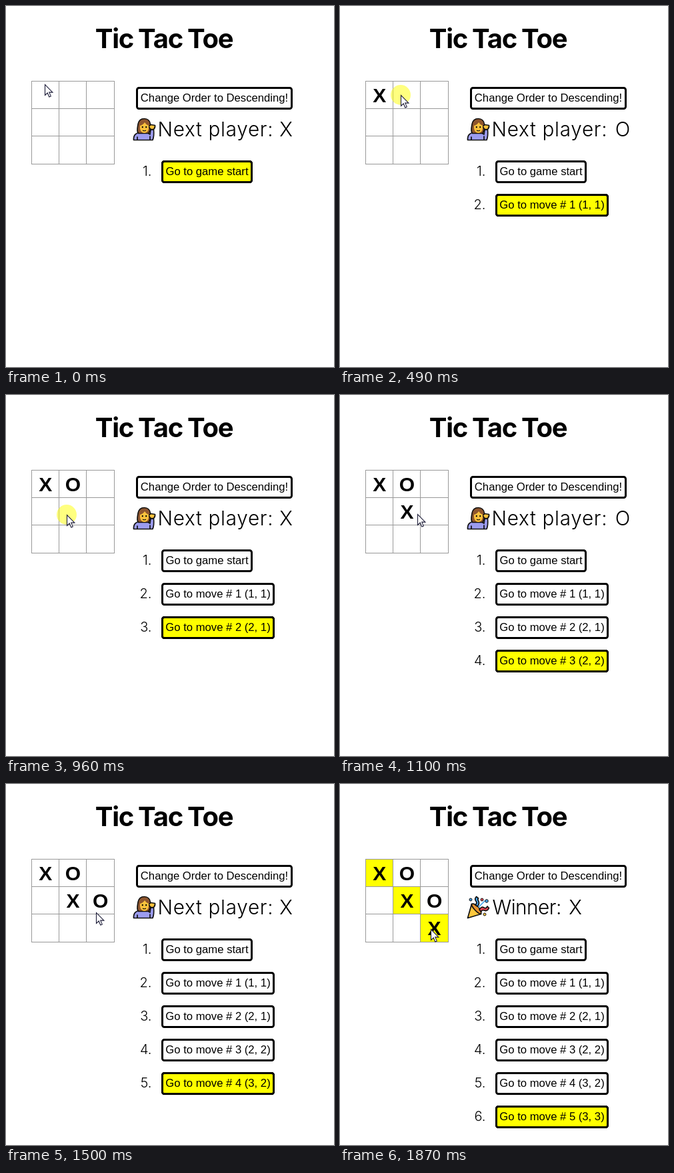
An HTML page that plays this animation: 492x540 px, repeating every 2190 ms.

```html
<!DOCTYPE html>
<html lang="en">
<head>
<meta charset="utf-8">
<title>Tic Tac Toe</title>
<style>
@property --n { syntax: "<integer>"; inherits: true; initial-value: 0; }
html, body { margin: 0; width: 100%; height: 100%; overflow: hidden; background: #fff; }
svg { display: block; width: 492px; height: 540px; animation: moves 2190ms step-end infinite; }

/* --n counts the moves made; --i is the move an element belongs to */
.from { opacity: calc(var(--n) - var(--i) + 1); }
.now { opacity: min(var(--n) - var(--i) + 1, var(--i) + 1 - var(--n)); }
.playing { opacity: calc(5 - var(--n)); }

text { fill: #000; }
.title, .status, .num { font-family: Inter, "Open Sans", sans-serif; }
.title { font-size: 40px; font-weight: 700; letter-spacing: -1.2px; word-spacing: -1.3px; text-anchor: middle; }
.status { font-size: 29.7px; font-weight: 300; }
.num { font-size: 20px; font-weight: 300; text-anchor: end; }
.label { font: 16.667px "Liberation Sans", Arial, sans-serif; text-anchor: middle; }
.mark { font: 700 30px "Liberation Sans", Arial, sans-serif; text-anchor: middle; }
.box { fill: #fff; stroke: #000; stroke-width: 3; }
.lit { fill: #ff0; }
.grid { fill: none; stroke: #999; }
.icon { stroke: #111; stroke-width: 1.7; stroke-linejoin: round; stroke-linecap: round; }
.pointer { animation: travel 2190ms step-end infinite; }
.ring { fill: #ff0; fill-opacity: .5; animation: click 2190ms step-end infinite; }

@keyframes moves {
  0% { --n: 0; }
  7.76% { --n: 1; }
  28.76% { --n: 2; }
  47.48% { --n: 3; }
  68.49% { --n: 4; }
  85.38%, 100% { --n: 5; }
}
@keyframes travel {
  0% { transform: translate(58px, 117px); }
  11.41% { transform: translate(64px, 119px); }
  15.06% { transform: translate(77px, 125px); }
  18.72% { transform: translate(88px, 131px); }
  22.37% { transform: translate(91px, 133px); }
  28.76% { transform: translate(88px, 157px); }
  32.87% { transform: translate(89px, 166px); }
  36.52% { transform: translate(91px, 174px); }
  40.18% { transform: translate(91px, 179px); }
  47.48% { transform: translate(92px, 179px); }
  50.22% { transform: translate(116px, 178px); }
  54.33% { transform: translate(126px, 177px); }
  57.53% { transform: translate(134px, 177px); }
  68.49% { transform: translate(135px, 192px); }
  71.23% { transform: translate(135px, 206px); }
  74.88%, 100% { transform: translate(136px, 217px); }
}
@keyframes click {
  0%, 7.76%, 28.76%, 47.48%, 68.49%, 85.38%, 100% { opacity: 0; }
  4.1%, 22.37%, 43.83%, 60.73%, 81.73% { opacity: 1; }
}
</style>
</head>
<body>
<svg viewBox="0 0 492 540">
  <text class="title" x="237" y="63">Tic Tac Toe</text>

  <g class="from lit" style="--i:5">
    <path d="M38 112h41v41h-41zM79 153h41v41h-41zM120 194h42v42h-42z"/>
  </g>
  <path class="grid" d="M38 112.5h125M38 153.5h125M38 194.5h125M38 236.5h125M38.5 112v125M79.5 112v125M120.5 112v125M162.5 112v125"/>
  <g id="marks"></g>

  <rect class="box" x="196.5" y="122.5" width="232" height="31" rx="3"/>
  <text class="label" x="312.5" y="143.3">Change Order to Descending!</text>

  <g class="playing">
    <g class="icon">
      <path fill="#9c9cf0" d="M191.5 200.5C191 193 195 189.5 201 189.5H212L216 192L217 185H221.5C222 191 222 196 220 200.5Z"/>
      <path fill="#8e562e" d="M198.5 190.5C195.5 187 197.5 181 198 177C199 171 203 168.5 207.5 168.5C212.5 168.5 216 172 216.5 177C217 182 216.500 187 214 190.5Z"/>
      <path fill="#fcc23c" d="M214 180.500L217 177.500L223.500 178.500Q224 182 221.500 184.500H217Z"/>
      <path fill="none" d="M197 200V196M216 200V195"/>
    </g>
    <path fill="#fcc23c" d="M201 179Q206 177.500 208 174Q210 177.500 214 179V183Q213 189.500 207.500 190Q202 189.500 201 183Z"/>
    <path d="M203.800 180h1.900v2.300h-1.900zM209.300 180h1.900v2.300h-1.900z"/>
    <path fill="none" stroke="#111" stroke-width="1.200" d="M205 186Q207.500 187.500 210 186"/>
    <text class="status" x="227.5" y="195" letter-spacing=".7">Next player:</text>
    <g id="turns"></g>
  </g>

  <g class="from" style="--i:5">
    <g class="icon">
      <path fill="#ffc83d" d="M191.5 200.5L197.5 179.5Q207 184 211.5 194.5Z"/>
      <path fill="#e8912d" d="M197.5 179.5Q201 178 207 183.5Q213 190 211.5 194.5Q207.5 194 202.5 188.5Q197 183 197.5 179.5Z"/>
      <path fill="#45a5ee" d="M203 181Q206.5 178 203.5 174.5Q201.5 171.5 204.5 168.5L207.5 171Q206 173 208 175.5Q209.5 180 206 183Z"/>
      <path fill="#e74856" d="M209 188Q212 182.5 216 185Q219 187 221 183L223.5 185.5Q221 191 216 189Q213 188 211.5 191Z"/>
      <path fill="none" stroke="#45a5ee" d="M208 184L217 175"/>
    </g>
    <g stroke="#111">
      <circle cx="196" cy="173" r="2" fill="#45a5ee"/>
      <circle cx="213" cy="173" r="2" fill="#e74856"/>
      <circle cx="220" cy="175" r="2.3" fill="#45a5ee"/>
      <circle cx="217" cy="195" r="2" fill="#ffc83d"/>
    </g>
    <text class="status" x="228.5" y="195" letter-spacing="-.5">Winner:</text>
    <text class="status" x="353" y="195" text-anchor="middle">X</text>
  </g>

  <g id="history"></g>

  <g class="pointer">
    <circle class="ring" r="15"/>
    <path fill="#fff" stroke="#1c1c38" stroke-width="1.1" d="M.5.5V16.5L4.2 13L6.8 19L9.3 17.9L6.8 12.1H11.9Z"/>
  </g>
</svg>
<script>
const cells = [[1, 1], [2, 1], [2, 2], [3, 2], [3, 3]];
const player = i => i % 2 ? "O" : "X";
const fill = (id, parts) => { document.getElementById(id).innerHTML = parts.join(""); };

fill("marks", cells.map(([col, row], i) =>
  `<text class="mark from" style="--i:${i + 1}" x="${18 + col * 41.2}" y="${102.6 + row * 41.2}">${player(i)}</text>`));

fill("turns", cells.map((_, i) =>
  `<text class="status now" style="--i:${i}" x="${i % 2 ? 424 : 420}" y="195" text-anchor="middle">${player(i)}</text>`));

const entry = (label, i) => {
  const y = 232.5 + i * 50, w = i ? 167 : 134;
  const box = `x="234.5" y="${y}" width="${w}" height="31" rx="3"`;
  return `<g class="from" style="--i:${i}">
    <text class="num" x="218.5" y="${y + 21}">${i + 1}.</text>
    <rect class="box" ${box}/><rect class="box lit now" ${box}/>
    <text class="label" x="${234.5 + w / 2}" y="${y + 20.8}">${label}</text></g>`;
};
const labels = cells.map(([col, row], i) => `Go to move # ${i + 1} (${col}, ${row})`);
fill("history", ["Go to game start", ...labels].map(entry));
</script>
</body>
</html>
```
